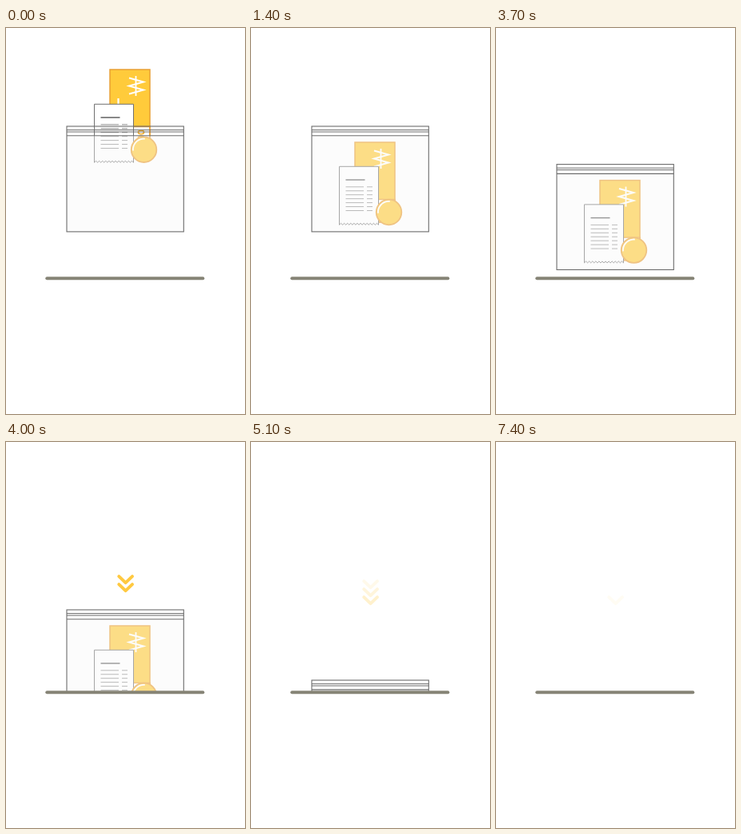
Write an HTML page with a canvas that moves like this. It is 299 px wide and 483 px high and loops after 8000 ms.

```html
<!DOCTYPE html>
<html lang="en">
<head>
<meta charset="utf-8">
<title>Pouch</title>
<style>
html, body { margin: 0; width: 100%; height: 100%; overflow: hidden; background: #fff; }
canvas { display: block; width: 299px; height: 483px; }
</style>
</head>
<body>
<canvas id="stage"></canvas>
<script>
const W = 299, H = 483, LOOP = 8000, STEP = 100;
const YELLOW = '#ffcb3b', ORANGE = '#e9a035', GREY = '#6c6c6c';
const canvas = document.getElementById('stage');
const ctx = canvas.getContext('2d');
const dpr = window.devicePixelRatio || 1;
canvas.width = W * dpr;
canvas.height = H * dpr;

const clamp = v => Math.max(0, Math.min(1, v));
const progress = (t, start, dur) => clamp((t - start) / dur);
const easeOut = (x, power = 2) => 1 - Math.pow(1 - x, power);
const smooth = x => x * x * (3 - 2 * x);
const mix = (a, b, k) => a + (b - a) * k;

// Strokes a polyline given as x, y pairs.
function line(color, width, ...p) {
  ctx.strokeStyle = color;
  ctx.lineWidth = width;
  ctx.beginPath();
  for (let i = 0; i < p.length; i += 2) ctx.lineTo(p[i], p[i + 1]);
  ctx.stroke();
}

function box(x, y, w, h, fill, stroke, width) {
  if (fill) {
    ctx.fillStyle = fill;
    ctx.fillRect(x, y, w, h);
  }
  if (stroke) {
    ctx.strokeStyle = stroke;
    ctx.lineWidth = width;
    ctx.strokeRect(x, y, w, h);
  }
}

function drawNote(y) {
  box(130, y, 50, 100, YELLOW);
  box(130, y + 71.5, 50, 28.5, '#fff', ORANGE, 1.4);
  box(130, y, 50, 100, null, ORANGE, 1.5);
  ctx.strokeStyle = YELLOW;
  ctx.lineWidth = 1.6;
  for (let i = 0; i < 3; i++) {
    ctx.beginPath();
    ctx.ellipse(169, y + 78.5 + i * 7, 3.6, 2.2, 0, 0, Math.PI * 2);
    ctx.strokeStyle = '#f3ae2c';
    ctx.stroke();
  }
  line('#fff', 2, 154, y + 10.5, 172, y + 15.5, 154, y + 20.5, 172, y + 25.5, 154, y + 30.5);
  line('#fff', 1.8, 162.5, y + 8, 162.5, y + 33);
  line('#fff', 2.2, 140.5, y + 36, 140.5, y + 44);
}

function drawReceipt(y) {
  const left = 110.5, right = 159.5, bottom = y + 73;
  ctx.beginPath();
  ctx.moveTo(left, bottom);
  ctx.lineTo(left, y);
  ctx.lineTo(right, y);
  ctx.lineTo(right, bottom);
  const teeth = 24;
  for (let i = 1; i <= teeth; i++) {
    ctx.lineTo(mix(right, left, i / teeth), bottom - (i % 2) * 2);
  }
  ctx.closePath();
  ctx.fillStyle = '#fff';
  ctx.fill();
  ctx.strokeStyle = '#707070';
  ctx.lineWidth = 1;
  ctx.stroke();
  line('#555', 1.4, 118.5, y + 16.7, 142.5, y + 16.7);
  for (let i = 0; i < 7; i++) {
    const row = y + 25.5 + i * 4.95;
    line('#777', 0.8, 118.5, row, 141, row);
    line('#777', 0.8, 145, row, 152, row);
  }
}

function drawCoin(y) {
  ctx.beginPath();
  ctx.arc(172.5, y, 15.8, 0, Math.PI * 2);
  ctx.fillStyle = YELLOW;
  ctx.fill();
  ctx.strokeStyle = ORANGE;
  ctx.lineWidth = 1.8;
  ctx.stroke();
  ctx.beginPath();
  ctx.arc(172.5, y, 13.6, Math.PI * 0.97, Math.PI * 1.53);
  ctx.strokeStyle = '#fff';
  ctx.lineWidth = 1.8;
  ctx.stroke();
}

function drawBag() {
  box(76, 134.7, 146.3, 120.2, 'rgba(247,247,247,.4)');
  box(76, 123, 146.3, 131.9, null, GREY, 1.1);
  line(GREY, 1, 76, 127.6, 222.3, 127.6);
  line(GREY, 1, 76, 130, 222.3, 130);
  line(GREY, 1.1, 76, 134.8, 222.3, 134.8);
}

function sink(t) {
  const x = progress(t, 3398, 2102);
  return 189.5 * (x + (0.902 - 0.2 * x) * x * (1 - x));
}

function drawPouch(t) {
  const drop = sink(t);
  if (drop >= 189) return;
  ctx.save();
  ctx.beginPath();
  ctx.rect(0, 0, W, 312);
  ctx.clip();
  ctx.translate(0, drop);
  drawNote(mix(52, 143, easeOut(progress(t, 488, 910))));
  drawReceipt(mix(95.3, 173.3, easeOut(progress(t, 567, 830))));
  drawCoin(mix(152.2, 230.5, easeOut(progress(t, 0, 1130), 2.2)));
  drawBag();
  ctx.restore();
}

// Three chevrons pop in one after another, drift down and fade.
function drawArrows(t) {
  const start = t >= 6000 ? 6000 : 3800;
  if (t < start) return;
  const age = Math.min(t - start, 1400);
  const shift = 6.5 * smooth(clamp(age / 1200));
  for (let i = 0; i < 3; i++) {
    const y = 167.6 + i * 10 + shift;
    const show = progress(age, i * 130 - 60, 100);
    const hide = progress(age, 855 + i * 38, 500);
    ctx.globalAlpha = show * (1 - hide);
    line('#ffc940', 4, 141.3, y, 149.6, y + 8, 158, y);
  }
  ctx.globalAlpha = 1;
}

function draw(t) {
  ctx.setTransform(dpr, 0, 0, dpr, 0, 0);
  ctx.fillStyle = '#fff';
  ctx.fillRect(0, 0, W, H);
  ctx.lineCap = 'butt';
  ctx.lineJoin = 'miter';
  drawPouch(t);
  ctx.lineCap = ctx.lineJoin = 'round';
  line('#868476', 4, 51.3, 313.2, 246.3, 313.2);
  drawArrows(t);
}

const begin = performance.now();
function tick() {
  const t = (performance.now() - begin) % LOOP;
  draw(Math.floor(t / STEP) * STEP);
  requestAnimationFrame(tick);
}
tick();
</script>
</body>
</html>
```
